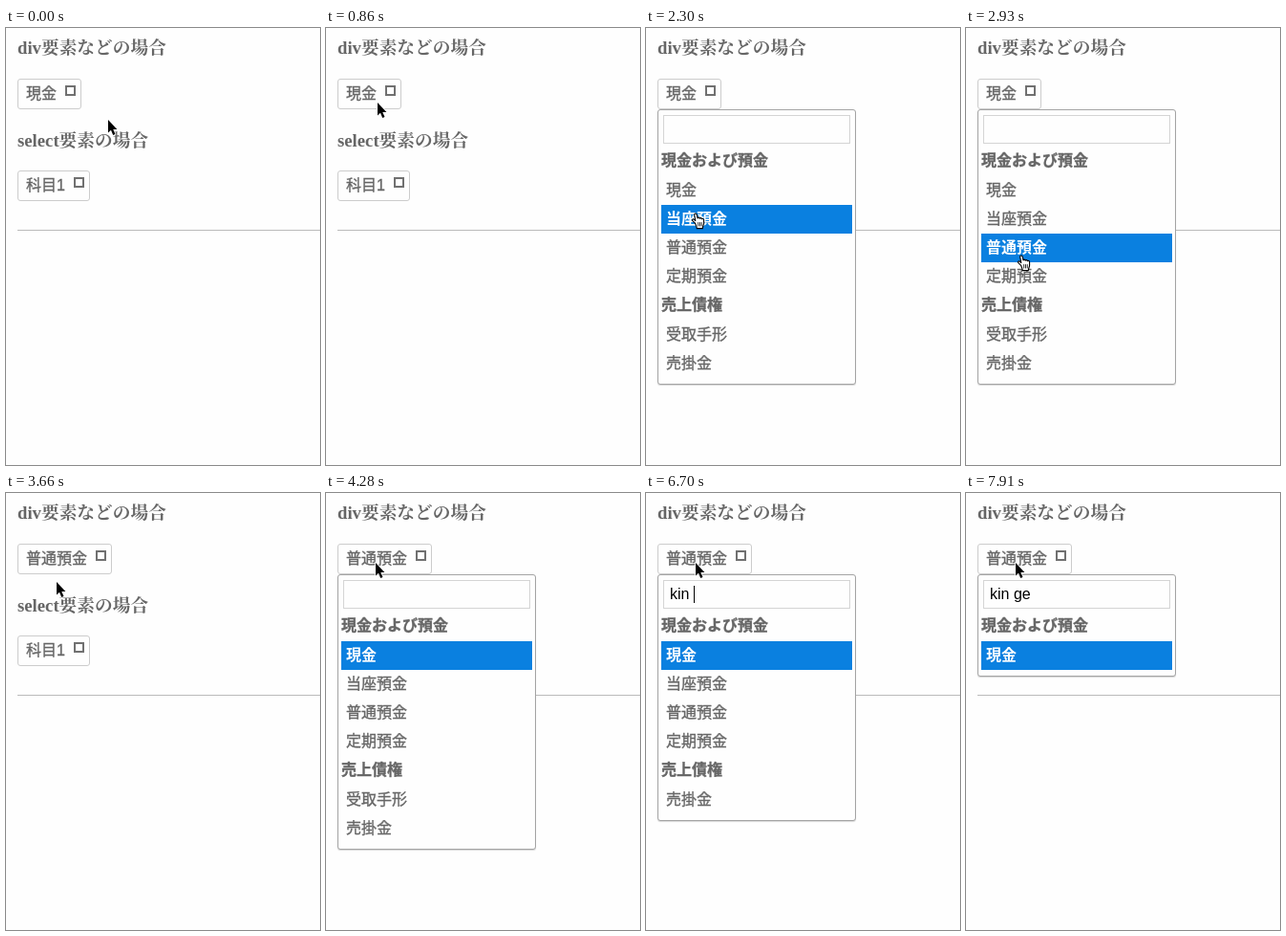
These frames come from a looping animation (329 by 457 pixels, 8 s). An HTML page:

```html
<!DOCTYPE html>
<html lang="ja">
<head>
<meta charset="utf-8">
<title>Searchable select</title>
<style>
  html, body { margin: 0; width: 100%; height: 100%; overflow: hidden; background: #fefefe; }
  #stage *, #stage *::after { box-sizing: border-box; }
  #stage {
    position: relative; width: 329px; height: 457px; overflow: hidden; color: #666;
    font: 500 16px/30px 'Liberation Sans', 'Noto Sans CJK JP', 'Noto Sans CJK', sans-serif;
    -webkit-text-stroke: .35px;
  }
  #stage > * { position: absolute; left: 12px; white-space: nowrap; }
  h3 {
    margin: 0;
    font: 700 18.72px/22px 'Liberation Serif', 'Noto Serif CJK JP', 'Noto Serif CJK', 'Noto Sans CJK JP', serif;
    -webkit-text-stroke: 0;
  }
  .button {
    height: 32px; padding: 0 25px 0 8px;
    border: 1px solid #ccc; border-radius: 3px; background: #fefefe;
  }
  .button::after {
    content: ""; position: absolute; right: 5px; top: 6px;
    width: 11px; height: 11px; border: 2px solid #707070;
  }
  .rule { top: 211px; width: 317px; height: 1px; background: #bbb; }
  #panel {
    top: 85px; width: 208px; padding: 5px 3px 6px;
    border: 1px solid #a4a4a4; border-radius: 3px; background: #fefefe;
    box-shadow: 0 1px 1px rgba(0, 0, 0, .16);
  }
  #search {
    position: relative; height: 30px; margin: 0 2px 3px; padding-left: 6px;
    border: 1px solid #d4d4d4; line-height: 28px; color: #000;
    -webkit-text-stroke: 0;
  }
  #query { white-space: pre; }
  #caret {
    position: absolute; top: 5px; left: 6px; width: 1px; height: 18px; background: #000;
  }
  .group { height: 31px; font-weight: 700; }
  .item { height: 30px; padding-left: 5px; }
  .item.on { background: #0a80e0; color: #fff; font-weight: 700; -webkit-text-stroke: 0; }
  #stage > #cursor { left: 0; top: 0; overflow: visible; }
  [hidden] { display: none !important; }
</style>
</head>
<body>
<div id="stage">
  <h3 style="top:10px">div要素などの場合</h3>
  <div class="button" style="top:53px" id="account">現金</div>
  <h3 style="top:107px">select要素の場合</h3>
  <div class="button" style="top:149px">科目1</div>
  <div class="rule"></div>
  <div id="panel">
    <div id="search"><span id="query"></span><i id="caret"></i></div>
    <div class="group">現金および預金</div>
    <div class="item">現金</div>
    <div class="item">当座預金</div>
    <div class="item">普通預金</div>
    <div class="item">定期預金</div>
    <div class="group">売上債権</div>
    <div class="item">受取手形</div>
    <div class="item">売掛金</div>
  </div>
  <svg id="cursor" width="20" height="20" stroke-linejoin="round" stroke-linecap="round">
    <path id="arrow" fill="#000" stroke="#fff" stroke-width="1.6" paint-order="stroke"
      d="M0 0V13.4L3 10.7L5.2 16L7.5 15L5.3 9.9H9.4Z"/>
    <g id="hand" fill="#fff" stroke="#000" stroke-width="1.1" transform="translate(-4.5 -1)">
      <path d="M4 11.2L1.3 8.6C.3 7.3 1.8 6.3 2.9 7.2L4.3 8.5L3.2 2.4C3 .7 5.3 .4 5.7 2.1L6.5 6C6.6 4.9 8.5 4.8 8.7 6.2C9.1 5.2 10.7 5.4 10.9 6.8C11.4 6 13.1 6.4 13.1 8V11C13.1 13 12 14 11.8 16.6H5.8C5.7 14.6 4.7 12.8 4 11.2Z"/>
      <path fill="none" stroke-width=".8" d="M7.2 10.5V14M9 10.5V14M10.8 10.5V14"/>
    </g>
  </svg>
</div>
<script>
  const LOOP = 8000;
  const $ = id => document.getElementById(id);
  const items = [...document.querySelectorAll('.item')];
  const groups = [...document.querySelectorAll('.group')];

  // Pointer path: time, x, y
  const path = [
    [0, 107, 96], [630, 107, 96], [800, 70, 83], [900, 44, 74], [1000, 49, 71],
    [1450, 49, 71], [1450, 49, 69], [2100, 49, 69], [2300, 52, 194], [2420, 54, 222],
    [2660, 58, 238], [3490, 58, 238], [3660, 53, 93], [3800, 48, 81], [4010, 52, 75],
    [4280, 52, 75], [4280, 52, 73], [LOOP, 52, 73]
  ];
  const typed = [[0, ''], [5410, 'k'], [5560, 'ki'], [5740, 'kin'],
                 [6700, 'kin '], [7230, 'kin g'], [7320, 'kin ge']];
  const caretOn = [[1480, 1950], [2450, 2930], [4310, 4790], [5290, 6310], [6700, 7910]];

  const within = (t, spans) => spans.some(([a, b]) => t >= a && t < b);

  function pointAt(t) {
    const i = path.findIndex(p => p[0] > t);
    const [t0, x0, y0] = path[i - 1], [t1, x1, y1] = path[i];
    const k = (t - t0) / (t1 - t0);
    return [Math.round(x0 + (x1 - x0) * k), Math.round(y0 + (y1 - y0) * k)];
  }

  // Which rows survive the search
  function matches(i, t) {
    if (t >= 7290) return i === 0;
    return t < 5650 || i !== 4;
  }

  function render(t) {
    const [x, y] = pointAt(t);
    const open = within(t, [[1450, 3280], [4280, LOOP]]);
    const pointing = open && y >= 155;
    const active = pointing ? Math.floor((y - 155) / 30) : 0;

    $('panel').hidden = !open;
    $('account').textContent = t < 3280 ? '現金' : '普通預金';
    items.forEach((el, i) => {
      el.hidden = !matches(i, t);
      el.classList.toggle('on', i === active);
    });
    groups[1].hidden = t >= 7290;

    $('query').textContent = typed.findLast(([at]) => t >= at)[1];
    $('caret').style.left = 6 + Math.round($('query').getBoundingClientRect().width) + 'px';
    $('caret').hidden = !within(t, caretOn);

    $('cursor').style.transform = `translate(${x}px, ${y}px)`;
    $('arrow').style.display = pointing ? 'none' : '';
    $('hand').style.display = pointing ? '' : 'none';
  }

  const start = performance.now();
  function tick() {
    render((performance.now() - start) % LOOP);
    requestAnimationFrame(tick);
  }
  tick();
</script>
</body>
</html>
```
